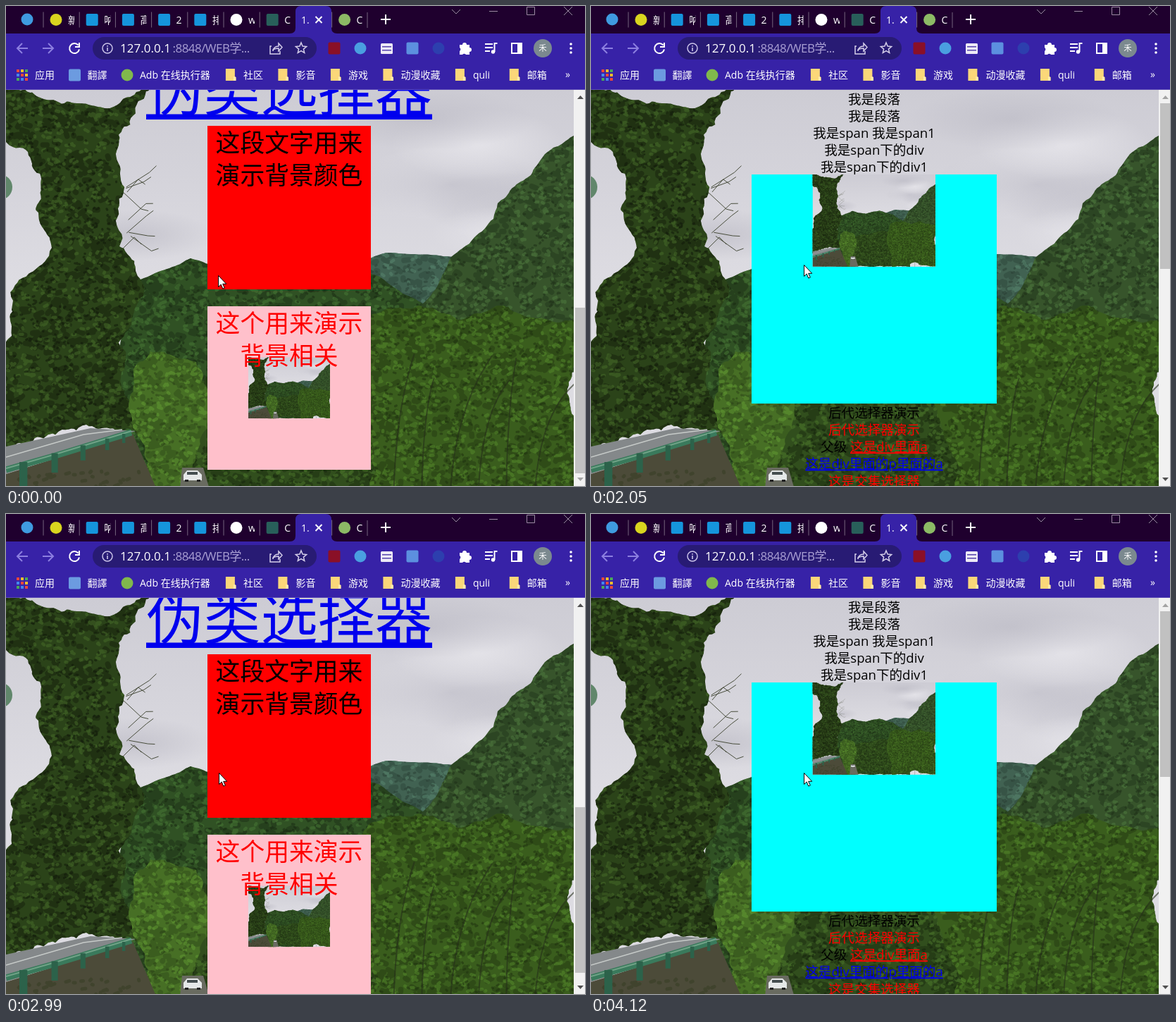
Write an HTML page that moves like this. It is 822 px wide and 681 px high and loops after 4.25 s.

```html
<!DOCTYPE html>
<html lang="zh-CN">
<head>
<meta charset="utf-8">
<title>Scrolling page</title>
<style>
html, body { margin: 0; width: 100%; height: 100%; overflow: hidden; }
svg { display: block; width: 822px; height: 681px; }
text { font-family: 'Open Sans', 'Noto Sans CJK SC', 'Noto Sans CJK', sans-serif; white-space: pre; }
.body, .box, .title, .name { text-anchor: middle; }
.body { font-size: 18.56px; }
.box { font-size: 34.8px; font-weight: 300; }
.title { font-size: 81.2px; font-weight: 300; }
.mark { font-size: 14px; fill: #fff; }
.name { font-size: 11.5px; fill: #fff; }
.url { font-size: 17px; fill: #fff; }
.path { fill: #aaa0d4; letter-spacing: -.55px; }
.link { text-decoration: underline; text-decoration-skip-ink: none; }
.line { fill: none; stroke: #fff; stroke-width: 2; }
.dim { stroke: #8c7fe0; }
.thin { stroke: #d5cfea; stroke-width: 1.5; }
.frame { stroke: #9a8ba1; stroke-width: 1; }
</style>
</head>
<body>
<svg id="stage" viewBox="0 0 822 681"></svg>
<script>
const LOOP = 4250, TOP = 119, PAGE_W = 806, VIEW_H = 562, PHOTO_H = PAGE_W * 3 / 4;
const stage = document.getElementById('stage');

let seed = 7;
const rnd = () => (seed = (seed * 16807) % 2147483647) / 2147483647;
const around = size => (rnd() - .5) * size;
const loop = (n, make) => Array.from({ length: n }, (_, i) => make(i)).join('');
const rect = (x, y, w, h, fill, more = '') =>
  `<rect x="${x}" y="${y}" width="${w}" height="${h}" fill="${fill}" ${more}/>`;
const circle = (x, y, r, fill, more = '') =>
  `<circle cx="${x}" cy="${y}" r="${r}" fill="${fill}" ${more}/>`;
const path = (d, fill, more = '') => `<path d="${d}" fill="${fill}" ${more}/>`;
const line = (d, cls = '') => `<path class="line ${cls}" d="${d}"/>`;
const stroke = (d, color, width, more = '') =>
  path(d, 'none', `stroke="${color}" stroke-width="${width}" ${more}`);
const text = (x, y, s, cls, fill = '') =>
  `<text x="${x}" y="${y}" class="${cls}" ${fill && `fill="${fill}"`}>${s}</text>`;
const at = (x, y, content) => `<g transform="translate(${x} ${y})">${content}</g>`;

// ---- landscape ----
// Displaces midpoints until the edge between two points is ragged.
function ragged([x, y], [u, v], amp) {
  const length = Math.hypot(u - x, v - y);
  if (length < 7) return [[x, y]];
  const mid = [(x + u) / 2 + around(length * amp), (y + v) / 2 + around(length * amp)];
  return [...ragged([x, y], mid, amp), ...ragged(mid, [u, v], amp)];
}

// Short round strokes scattered over a box.
function dabs(x, y, w, h, size, color) {
  const d = loop(Math.round(w * h / 130), () =>
    `M${(x + rnd() * w).toFixed(1)} ${(y + rnd() * h).toFixed(1)}`
    + `l${around(size * 2).toFixed(1)} ${around(size).toFixed(1)}`);
  return stroke(d, color, size, 'stroke-linecap="round" opacity=".5"');
}

let woods = 0;
// Foliage inside an outline; the tones follow from hue, saturation and lightness.
function wood(outline, amp, [h, s, l], size = 4.5) {
  const pts = outline.split(' ').map(p => p.split(',').map(Number));
  const edge = pts.flatMap((p, i) => ragged(p, pts[(i + 1) % pts.length], amp));
  const d = 'M' + edge.map(p => p.map(n => n.toFixed(1)).join(' ')).join('L') + 'Z';
  const tone = step => `hsl(${h},${s}%,${l + step}%)`;
  const xs = pts.map(p => p[0]), ys = pts.map(p => p[1]);
  const x = Math.min(...xs), y = Math.min(...ys);
  const box = [x, y, Math.max(...xs) - x, Math.max(...ys) - y];
  const id = 'wood' + woods++;
  return `<clipPath id="${id}">${path(d, '#000')}</clipPath>${path(d, tone(0))}`
    + `<g clip-path="url(#${id})">${dabs(...box, size * 1.7, tone(-9))}`
    + `${dabs(...box, size, tone(12))}${dabs(...box, size * .7, tone(-12))}</g>`;
}

const cloud = i => `<ellipse cx="${180 + rnd() * 600}" cy="${150 + rnd() * 190}" rx="${90 + rnd() * 90}"
  ry="${30 + rnd() * 30}" fill="url(#${i % 2 ? 'glow' : 'shade'})"/>`;

function twig() {
  const x = 155 + rnd() * 25, y = 230 + rnd() * 120;
  return `M${x} ${y}l${15 + rnd() * 20} ${around(50)}l10 ${around(20)}`;
}

function road() {
  const rail = 'M0 658L70 638 178 605';
  const post = i => {
    const k = (i / 4) ** 1.3, h = 13 + 21 * k;
    return rect(165 - 146 * k, 607 + 40 * k, h / 3, h, '#2c624a');
  };
  return path('M0 625L120 599 184 603 0 664Z', '#84888a')
    + stroke('M0 640L110 608 165 601', '#c6cac8', 1.4)
    + path('M0 664L180 607 230 723H0Z', '#4c4b39') + dabs(20, 660, 180, 63, 5, '#343d22')
    + stroke(rail, '#3a7a5c', 9) + at(0, -2, stroke(rail, '#70a287', 2)) + loop(5, post)
    + path('M243 723L250 655H280L300 723Z', '#696b60');
}

const car = path('M-13 7V-1L-8-7H7L13-1V7Z', '#e5e8e8') + rect(-8, -5, 15, 4, '#454e50')
  + rect(-11, 6, 5, 3, '#222') + rect(6, 6, 5, 3, '#222');

function photo() {
  return rect(0, TOP, PAGE_W, PHOTO_H, 'url(#sky)') + loop(8, cloud)
    + wood('480,372 540,350 634,356 620,450 480,450', .08, [150, 20, 32])
    + wood('165,395 262,358 350,376 440,356 530,384 640,450 640,723 160,723', .08, [105, 38, 23])
    + wood('812,180 765,210 745,240 698,280 692,302 632,356 590,425 640,520 812,520', .14, [103, 32, 25])
    + wood('240,560 330,510 440,490 540,500 620,570 620,723 240,723', .25, [95, 46, 21])
    + wood('515,440 585,425 640,445 700,425 812,445 812,723 520,723 500,600', .25, [93, 52, 24])
    + stroke(loop(6, i => `M${550 + 40 * i} 723q0-140 ${40 + around(60)} ${-220 + around(60)}`),
      '#263019', 2, 'opacity=".6"')
    + stroke(loop(9, twig), '#484d3c', 1)
    + wood('-6,113 208,113 165,175 158,300 192,390 180,440 200,615 -6,640', .35, [94, 45, 18])
    + wood('175,560 205,490 270,505 285,600 250,723 190,723', .25, [92, 50, 29])
    + road() + at(265, 666, car);
}

// ---- page ----
const BOX = 232, MID = 402, RED = '#f00', BLUE = '#00e';
const thumb = (x, y, w) =>
  at(x, y, `<use href="#photo" transform="scale(${w / PAGE_W}) translate(0 ${-TOP})"/>`);
const lines = (y, step, cls, list) =>
  list.map(([s, color], i) => text(MID, y + step * i, s, cls, color)).join('');

function page() {
  return lines(138.8, 24.1, 'body',
    [['我是段落'], ['我是段落'], ['我是span 我是span1'], ['我是span下的div'], ['我是span下的div1']])
    + rect(228, 239, 348, 325, '#0ff') + thumb(314.5, 239, 174.5)
    + lines(584, 24.15, 'body', [
      ['后代选择器演示'], ['后代选择器演示', RED],
      [`父级 <tspan class="link" fill="${RED}">这是div里面a</tspan>`],
      ['<tspan class="link">这是div里面的p里面的a</tspan>', BLUE],
      ['这是交集选择器', RED], ['这是交集选择器1'], ['这是交集选择器2']])
    + rect(199, 848.5, 406, 7.5, BLUE) + text(MID, 844, '伪类选择器', 'title', BLUE)
    + rect(286, 865, BOX, BOX, RED)
    + lines(902, 46.3, 'box', [['这段文字用来'], ['演示背景颜色']])
    + rect(286, 1121, BOX, BOX, '#ffc0cb') + thumb(344, 1193.3, BOX / 2)
    + lines(1158, 46.3, 'box', [['这个用来演示', RED], ['背景相关', RED]]);
}

// ---- browser window ----
const square = fill => rect(-8.5, -8.5, 17, 17, fill, 'rx="2"');
const disc = fill => circle(0, 0, 8.5, fill);

function tabs() {
  const video = square('#1595dc');
  const list = [[disc('#d9d51f'), '新'], [video, '呐'], [video, '高'], [video, '2'], [video, '排'],
    [disc('#fff'), 'w'], [square('#285f5a'), 'C'], null, [disc('#8cba65'), 'C']];
  const tab = (item, i) => item ? at(53 + 51.2 * i, 19.5, rect(-.5, -11, 1, 22, '#75657d')
    + at(18, 0, item[0]) + `<g clip-path="url(#label)">${text(35, 5, item[1], 'mark')}</g>`) : '';
  return rect(0, 0, 822, 39, '#1f002e')
    + path('M403 39q8 0 8-8V8q0-8 8-8h35q8 0 8 8v23q0 8 8 8z', '#3722a7')
    + at(30, 19, disc('#3f9be0')) + list.map(tab).join('') + rect(512.5, 9, 1, 22, '#75657d')
    + text(419, 24.5, '1.', 'mark') + line('M439.5 15l9 9m0-9l-9 9') + line('M532 19h14M539 12v14')
    + line('M633 5l6 6 6-6M686 7.500h12M739.500 1.500h11v11h-11zM792 1l12 12m0-12L792 13', 'frame');
}

function star() {
  const point = i => {
    const r = i % 2 ? 3.6 : 8, a = Math.PI * i / 5;
    return `${i ? 'L' : 'M'}${r * Math.sin(a)} ${-r * Math.cos(a)}`;
  };
  return line(loop(10, point) + 'Z', 'thin');
}

function toolbar() {
  const arrow = 'M8 0H-7m7-7l-7 7 7 7';
  const list = rect(-8, -7, 17, 15, '#edeaf6', 'rx="1.5"') + loop(2, i => rect(-6, 5 * i - 3, 13, 1.5, '#5644ad'));
  const puzzle = path('M-7-5h4a3 3 0 0 1 6 0h4v4a3 3 0 0 1 0 6v4h-5a3 3 0 0 0-5 0h-4v-5a3 3 0 0 0 0-5z', '#fff');
  const music = line('M-8-6H3M-8-1H3M-8 4h7M5.500 5V-7h4') + circle(3.5, 5, 2.7, '#fff');
  const panel = line('M-7-7H7V7H-7z') + rect(1, -7, 6, 14, '#fff');
  const avatar = circle(0, 0, 13, '#7b898f') + text(0, 4, '禾', 'name');
  const menu = loop(3, i => circle(3, 6 * i - 6, 1.8, '#fff'));
  const info = circle(0, 0, 7, 'none', 'stroke="#c9c2e8" stroke-width="1.5"')
    + rect(-.8, -1, 1.6, 5, '#c9c2e8') + rect(-.8, -4, 1.6, 1.7, '#c9c2e8');
  return rect(0, 39, 822, 80, '#3722a7') + rect(0, 118, 822, 1, '#5a49b5')
    + at(23, 60, line(arrow, 'dim')) + at(60, 60, `<g transform="scale(-1 1)">${line(arrow, 'dim')}</g>`)
    + line('M102.500 55.500a7 7 0 1 0 1.500 6M104 52v6h-6')
    + rect(123, 44, 318, 32, '#281b74', 'rx="16"') + at(144, 60, info)
    + text(162, 66, '127.0.0.1', 'url') + text(236.5, 66, ':8848/WEB学...', 'url path')
    + at(382, 60, line('M-5-3h-2V8H7V4M-3 4q1-7 8-7v-4l5 5.500-5 5.500v-4q-5 0-8 2z', 'thin'))
    + at(419, 60, star())
    + [square('#8a1027'), disc('#4a9fe0'), list, square('#5c90df'), disc('#2d3fae'),
      puzzle, music, panel, avatar, menu].map((icon, i) => at(466 + 37 * i, 60, icon)).join('');
}

function bookmarks() {
  const colors = ['#e8473c', '#f1bd2d', '#48a85b', '#4386eb'];
  const apps = loop(9, i => rect(i % 3 * 6 - 8, Math.floor(i / 3) * 6 - 8, 4, 4, colors[i % 4]));
  const folder = path('M-7-9H6V2l1.500 1v5H-7z', '#fbd779') + path('M4 8V2l3.500 1v5z', '#ffebae');
  const width = s => [...s].reduce((sum, c) => sum + (c > '\u2e80' ? 14 : 7.6), 0);
  let x = 23;
  return [[apps, '应用'], [square('#6c9be0'), '翻譯'], [disc('#80b84c'), 'Adb 在线执行器'], [folder, '社区'],
    [folder, '影音'], [folder, '游戏'], [folder, '动漫收藏'], [folder, 'quli'], [folder, '邮箱']]
    .map(([icon, label]) => {
      const item = at(x, 98, icon + text(18, 5, label, 'mark'));
      x += width(label) + 46.5;
      return item;
    }).join('') + text(794, 101.5, '»', 'mark');
}

const stops = (...list) => list.map(([o, c, a = 1]) =>
  `<stop offset="${o}" stop-color="${c}" stop-opacity="${a}"/>`).join('');
const clip = (id, ...box) => `<clipPath id="${id}">${rect(...box, '#000')}</clipPath>`;

stage.innerHTML = `<defs>
  <linearGradient id="sky" x2="0" y2="1">${stops([0, '#cdccd4'], [.45, '#dddce2'])}</linearGradient>
  <radialGradient id="glow">${stops([0, '#e8e7ec', .8], [1, '#e8e7ec', 0])}</radialGradient>
  <radialGradient id="shade">${stops([0, '#bdbcc6', .7], [1, '#bdbcc6', 0])}</radialGradient>
  ${clip('frame', 0, TOP, PAGE_W, PHOTO_H)}${clip('view', 0, TOP, PAGE_W, VIEW_H)}${clip('label', 35, -12, 9, 24)}
  <g id="photo" clip-path="url(#frame)">${photo()}</g></defs>
  <g clip-path="url(#view)"><use href="#photo"/>
    ${circle(-9, 257, 18, '#557f60', 'opacity=".9"')}<g id="page">${page()}</g></g>
  ${rect(PAGE_W, TOP, 16, VIEW_H, '#f1f1f1')}${rect(808, 138, 14, 235, '#c1c1c1', 'id="bar"')}
  ${path('M811 132l4.500-5 4.500 5z', '', 'id="up"')}${path('M811 669l4.500 5 4.500-5z', '', 'id="down"')}
  ${tabs()}${toolbar()}${bookmarks()}
  ${path('M0 0V16l3.700-3.400 2.600 6 2.500-1.100-2.600-5.700h5z', '#fff', 'id="cursor" stroke="#000"')}`;

// ---- motion ----
const MAX_SCROLL = 695, NOTCH = 116, STEP = 200 / 3, SETTLE = 11;
// Wheel turns: easing begins, first and last visible step, notches (down is positive).
const turns = [[1026, 1110, 1520, -4], [1790, 1850, 2050, -2], [2447, 2450, 3060, 6], [3447, 3460, 4120, -6]];

const clamp = (v, lo, hi) => Math.min(hi, Math.max(lo, v));
const ease = p => p * p * (3 - 2 * p);

function scrollAt(t) {
  let y = MAX_SCROLL;
  for (const [begin, first, last, notches] of turns) {
    if (t < first) break;
    const gap = (last - first) / Math.round((last - first) / STEP);
    const seen = Math.min(last, first + gap * Math.floor((t - first + 5) / gap));
    const part = ease((seen - begin) / (last + SETTLE - begin));
    const moved = Math.ceil(NOTCH * Math.abs(notches) * part);
    y = clamp(y + Math.sign(notches) * moved, 0, MAX_SCROLL);
  }
  return y;
}

const $ = id => document.getElementById(id);
const put = (id, x, y) => $(id).setAttribute('transform', `translate(${x} ${y})`);
const shade = (id, off) => $(id).setAttribute('fill', off ? '#a3a3a3' : '#505050');

function draw(t) {
  const y = scrollAt(t);
  put('page', 0, -y);
  put('bar', 0, y * 290 / MAX_SCROLL);
  shade('up', y === 0);
  shade('down', y === MAX_SCROLL);
  put('cursor', t < 120 ? 301.5 : 302.5, t < 120 ? 382.5 : t < 190 ? 371.5 : 367.5);
}

const start = performance.now();
function tick() {
  draw((performance.now() - start) % LOOP);
  requestAnimationFrame(tick);
}
tick();
</script>
</body>
</html>
```
